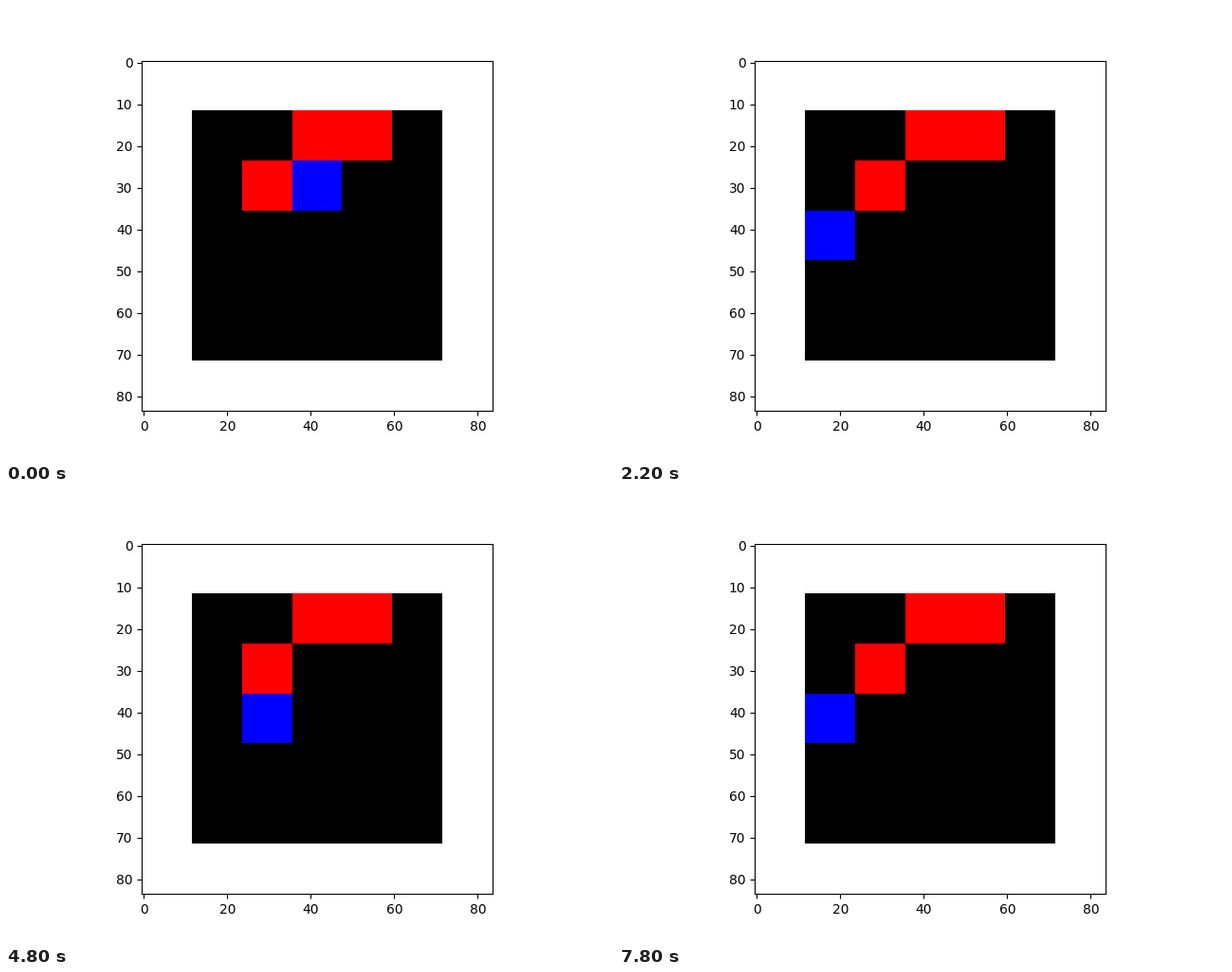
A matplotlib script that plays this animation: 640 px wide and 480 px high, repeating every 8 s.

```python
import numpy as np
import matplotlib.pyplot as plt
from matplotlib.animation import FuncAnimation

FRAMES, STEP_MS = 40, 200
CELL, GRID = 12, 7
WHITE, BLACK, RED, BLUE = (255, 255, 255), (0, 0, 0), (255, 0, 0), (0, 0, 255)
WALLS = [(1, 3), (1, 4), (2, 2)]
START = [(2, 3), (3, 3)]


def agent_cell(i):
    """Row and column of the blue cell: walk in, then step left and right."""
    if i < len(START):
        return START[i]
    return 3, 2 - i % 2


def room(i):
    cells = np.full((GRID, GRID, 3), WHITE, dtype=np.uint8)
    cells[1:-1, 1:-1] = BLACK
    for cell in WALLS:
        cells[cell] = RED
    cells[agent_cell(i)] = BLUE
    return cells.repeat(CELL, axis=0).repeat(CELL, axis=1)


fig, ax = plt.subplots(figsize=(6.4, 4.8), dpi=100)
image = ax.imshow(room(0), interpolation="nearest")


def update(i):
    image.set_data(room(i))
    return (image,)


anim = FuncAnimation(fig, update, frames=FRAMES, interval=STEP_MS,
                     init_func=lambda: update(0), repeat=True, repeat_delay=0)
plt.show()
```
